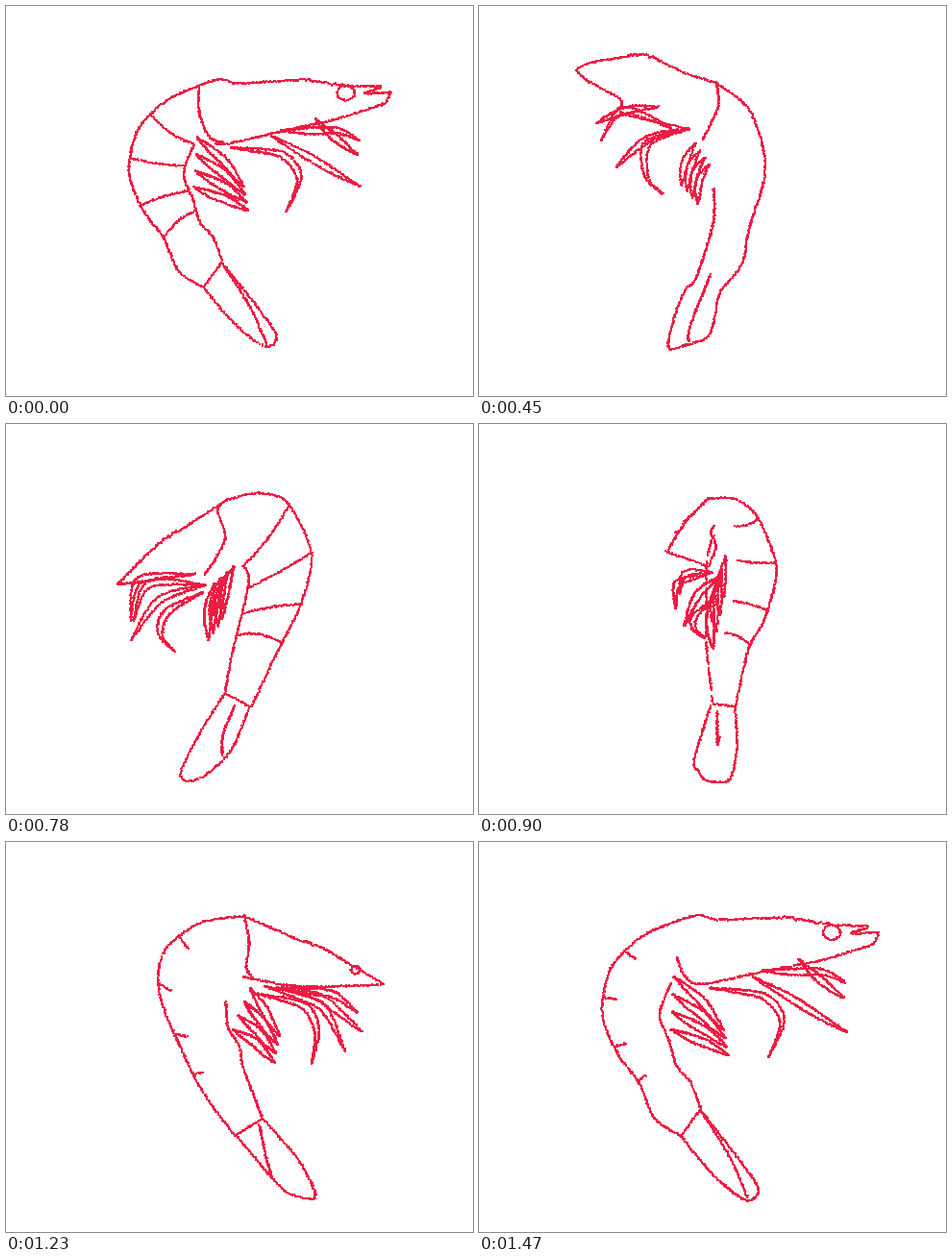
Animation, 486 px wide and 406 px high, one loop 1500 ms. Source, as an HTML page with a canvas:

```html
<!DOCTYPE html>
<html lang="en">
<head>
<meta charset="utf-8">
<title>Turning shrimp</title>
<style>
html, body { margin: 0; width: 100%; height: 100%; overflow: hidden; background: #fff; }
canvas { display: block; width: 486px; height: 406px; }
</style>
</head>
<body>
<canvas id="stage" width="486" height="406"></canvas>
<script>
const ctx = document.getElementById('stage').getContext('2d');
const LOOP = 1500, STEP = 30, SAMPLES = 60;

// Blend numbers, or arrays and objects of them.
function mix(a, b, u) {
  if (typeof a === 'number') return a + (b - a) * u;
  if (Array.isArray(a)) return a.map((v, i) => mix(v, b[i], u));
  return Object.fromEntries(Object.keys(a).map(k => [k, mix(a[k], b[k], u)]));
}
const dist = (a, b) => Math.hypot(b[0] - a[0], b[1] - a[1]);

// Smooth curve through a few points, sampled evenly along its length.
function curve(text) {
  const pts = text.trim().split(/\s+/).map(p => p.split(',').map(Number));
  const fine = [pts[0]];
  for (let i = 0; i < pts.length - 1; i++) {
    const b = pts[i], c = pts[i + 1], a = pts[i - 1] || b, d = pts[i + 2] || c;
    for (let s = 1; s <= 16; s++) {
      const u = s / 16, v = 1 - u;
      fine.push([0, 1].map(k =>
        b[k] * v * v * (1 + 2 * u) + c[k] * u * u * (3 - 2 * u) +
        0.42 * ((c[k] - a[k]) * u * v * v - (d[k] - b[k]) * u * u * v)));
    }
  }
  const sum = [0];
  for (let i = 1; i < fine.length; i++) sum.push(sum[i - 1] + dist(fine[i - 1], fine[i]));
  return Array.from({ length: SAMPLES + 1 }, (_, n) => {
    const s = sum.at(-1) * n / SAMPLES;
    const i = Math.max(1, sum.findIndex(v => v >= s - 1e-6));
    return mix(fine[i - 1], fine[i], (s - sum[i - 1]) / (sum[i] - sum[i - 1]));
  });
}

// Strings become curves, strings with slashes become lists of curves.
const pose = spec => Object.fromEntries(Object.entries(spec).map(([k, v]) =>
  [k, typeof v !== 'string' ? v : v.includes('/') ? v.split('/').map(curve) : curve(v)]));

function remap(v, fn) {
  if (typeof v === 'number') return v;
  if (Array.isArray(v)) return typeof v[0] === 'number' ? [...fn(v), ...v.slice(2)] : v.map(w => remap(w, fn));
  return Object.fromEntries(Object.entries(v).map(([k, w]) => [k, remap(w, fn)]));
}

// Seen end-on, the two outlines trade places.
const swap = p => ({ ...p, back: p.belly, belly: p.back, tail: [...p.tail].reverse() });

const profile = pose({
  head: '212,80 230,76 250,81 312,79 357,86 406,88 386,95 416,94',
  jaw: '416,94 410,106 390,113 352,124 300,134 240,147 222,147',
  seam: '206,120 212,137 222,147',
  back: '212,80 170,98 138,130 128,178 144,220 166,250 183,288 210,306',
  belly: '200,147 188,179 198,207 206,234 220,250 231,278',
  tail: '210,306 245,348 278,373 291,362 270,330 231,280',
  mid: '231,280 262,330 280,371',
  legs: '240,152 298,158 318,185 301,225 / 285,140 330,162 383,198 / 295,134 355,132 382,147 / 333,122 360,143 380,163',
  swim: '203,140 235,163 255,196 / 200,195 235,205 260,222',
  eye: [367, 94, 9], rings: 0.25, dash: 0
});

const start = {
  ...remap(profile, ([x, y]) => [0.945 * x + 7, 0.94 * y - 0.02 * x + 9.4]),
  ...pose({ seam: '201,83 201,110 211,136 228,143', rings: 1 })
};

const nearFront = pose({
  head: '191,90 215,78 265,63 285,57 335,60 353,64',
  jaw: '353,64 335,88 308,101 245,124 204,139',
  seam: '191,90 192,108 204,139',
  back: '191,90 165,128 155,165 158,195 178,243 209,290',
  belly: '191,167 195,207 212,200 213,232 228,273',
  tail: '209,290 228,330 236,356 238,346 255,356 272,358 276,349 257,307 228,273',
  mid: '218,277 234,315 237,350',
  legs: '224,145 265,143 281,180 267,204 / 253,122 295,146 339,170 / 265,125 300,122 327,131 / 285,104 305,108 323,117',
  swim: '202,149 220,165 235,188 / 190,180 212,190 237,212',
  eye: [299, 69, 6], rings: 0, dash: 0
});

const left = pose({
  head: '247,80 215,70 175,53 131,56 108,62 101,67',
  jaw: '101,67 113,78 148,98 150,112 219,128',
  seam: '247,80 249,105 232,140',
  back: '247,80 280,106 295,145 297,180 281,232 275,265 262,285',
  belly: '244,190 244,225 226,283 216,293',
  tail: '262,285 250,300 240,342 215,353 197,355 206,315 216,293',
  mid: '241,279 220,333 218,350',
  legs: '219,128 178,145 177,180 192,196 / 207,129 177,142 143,168 / 200,127 150,112 127,140 / 186,105 155,112 122,122',
  swim: '225,143 219,160 211,187 / 240,165 233,180 228,207',
  eye: [120, 59, 0], rings: 0, dash: 0
});

const leftBack = pose({
  head: '230,79 190,105 150,133 116,167',
  jaw: '116,167 142,164 198,156',
  seam: '230,79 220,90 228,120 207,157',
  back: '230,79 262,72 293,82 318,135 307,188 285,232 255,295',
  belly: '247,147 253,162 245,200 234,245 228,280',
  tail: '253,296 234,340 207,366 188,372 182,362 200,325 228,280',
  mid: '238,293 226,323 225,345',
  legs: '205,175 170,198 163,221 177,238 / 207,168 162,186 130,226 / 207,168 150,170 133,205 / 195,157 140,166 130,205',
  swim: '237,148 232,175 225,203 / 217,166 215,190 211,225',
  eye: [140, 143, 0], rings: 1, dash: 0
});

const rear = pose({
  head: '248,76 265,79 278,95',
  jaw: '274,99 279,128 278,140',
  seam: '261,133 270,141',
  back: '248,76 230,88 223,115 227,150 231,190 240,236 259,303',
  belly: '248,76 273,85 290,123 301,165 290,212 276,236 279,293',
  tail: '255,304 251,371 264,374 272,360 285,370 312,377 300,335 280,293',
  mid: '258,306 270,350 275,306',
  legs: '277,195 284,204 294,209 / 295,150 301,170 297,195 / 279,142 282,148 285,150 / 273,160 277,170 280,180',
  swim: '277,128 281,142 285,158 / 270,188 275,215 277,245',
  eye: [270, 82, 0], rings: 0.15, dash: 1
});

const front = {
  ...remap(rear, ([x, y]) => [494 - x, 1.08 * y - 44]),
  ...pose({ head: '246,38 225,50 236,80', jaw: '236,80 215,105 236,125', eye: [226, 60, 4], rings: 0, dash: 0 })
};

const right = pose({
  head: '248,77 300,100 342,118 393,148',
  jaw: '393,148 357,150 300,150 246,140',
  seam: '248,77 253,105 250,130 258,143',
  back: '248,77 200,85 164,115 160,160 188,228 206,262 238,306',
  belly: '229,167 231,193 243,213 247,235 267,288',
  tail: '240,306 277,350 295,366 322,370 305,332 267,288',
  mid: '264,295 270,325 277,350',
  legs: '262,158 312,168 326,195 318,231 / 270,150 330,168 353,218 / 282,151 330,160 371,198 / 290,152 340,155 366,178',
  swim: '254,152 272,172 285,202 / 236,195 262,206 280,230',
  eye: [364, 133, 5], rings: 0.2, dash: 0
});

const keys = [
  { t: 0, p: start },
  { t: 210, p: nearFront },
  { t: 330, p: front, turn: true },
  { t: 450, p: left },
  { t: 600, p: remap(profile, ([x, y]) => [476 - 1.066 * x, 1.04 * y - 15]) },
  { t: 780, p: leftBack },
  { t: 1020, p: rear, turn: true },
  { t: 1230, p: right },
  { t: 1380, p: remap(profile, ([x, y]) => [1.04 * x - 2, 1.03 * y - 5]) },
  { t: 1470, p: profile }
];

function shrimpAt(t) {
  const i = keys.findLastIndex(k => k.t <= t);
  const a = keys[i], b = keys[(i + 1) % keys.length];
  return mix(a.p, b.turn ? swap(b.p) : b.p, (t - a.t) / ((b.t || LOOP) - a.t));
}

function random(seed) {
  return () => (seed = (Math.imul(seed, 1664525) + 1013904223) >>> 0) / 4294967296;
}
let rnd;

// Crayon line: small dabs scattered along the way, with optional gaps.
function crayon(pts, gap = 0) {
  let run = 0;
  for (let i = 1; i < pts.length; i++) {
    const len = dist(pts[i - 1], pts[i]), n = Math.max(1, Math.ceil(len / 0.9));
    for (let s = 0; s < n; s++) {
      if ((run + len * s / n) % 28 < gap) continue;
      const [x, y] = mix(pts[i - 1], pts[i], s / n);
      ctx.fillRect(Math.round(x - 1 + (rnd() - 0.5) * 1.5), Math.round(y - 1 + (rnd() - 0.5) * 1.5), 2, 2);
    }
    run += len;
  }
}

// Limb: a line and its twin, parted in the middle.
function limb(line, width) {
  const a = line[0], b = line[SAMPLES], len = dist(a, b) || 1;
  const w = Math.min(width, len * 0.15) / len;
  crayon(line);
  crayon(line.map(([x, y], i) => {
    const k = w * Math.sin(Math.PI * i / SAMPLES);
    return [x - (b[1] - a[1]) * k, y + (b[0] - a[0]) * k];
  }));
}

const along = (line, u) => line[Math.round(Math.min(1, Math.max(0, u)) * SAMPLES)];

function drawRings(p) {
  if (p.rings < 0.05) return;
  for (const u of [0.23, 0.42, 0.6, 0.75]) {
    const a = along(p.back, u), b = along(p.belly, (u - 0.25) * 1.1);
    crayon([0, 0.25, 0.5, 0.75, 1].map(s => {
      const [x, y] = mix(a, b, s * p.rings);
      return [x, y + 20 * (0.5 - u) * p.rings * Math.sin(Math.PI * s)];
    }));
  }
  crayon([p.back[SAMPLES], p.belly[SAMPLES]]);
}

function draw(step) {
  const p = shrimpAt(step * STEP);
  rnd = random(step * 7919 + 17);
  ctx.fillStyle = '#fff';
  ctx.fillRect(0, 0, 486, 406);
  ctx.fillStyle = '#ee1c43';

  // Small spines on the brow.
  crayon(p.head.map(([x, y], i) =>
    [x, y - (i > 0.42 * SAMPLES && i < 0.62 * SAMPLES ? 2.5 * Math.abs(Math.sin(i * 1.3)) : 0)]));
  for (const k of ['jaw', 'seam', 'back', 'tail', 'mid']) crayon(p[k]);
  crayon(p.belly, 10 * p.dash);
  drawRings(p);
  for (const leg of p.legs) limb(leg, 7);
  for (let k = 0; k < 4; k++) limb(mix(p.swim[0], p.swim[1], k / 3), 8);

  const [x, y, r] = p.eye;
  crayon(Array.from({ length: 17 }, (_, i) =>
    [x + r * Math.cos(i * Math.PI / 8), y + 0.85 * r * Math.sin(i * Math.PI / 8)]));
}

let shown = -1;
function tick() {
  const step = Math.floor(performance.now() % LOOP / STEP);
  if (step !== shown) draw(shown = step);
  requestAnimationFrame(tick);
}
tick();
</script>
</body>
</html>
```
